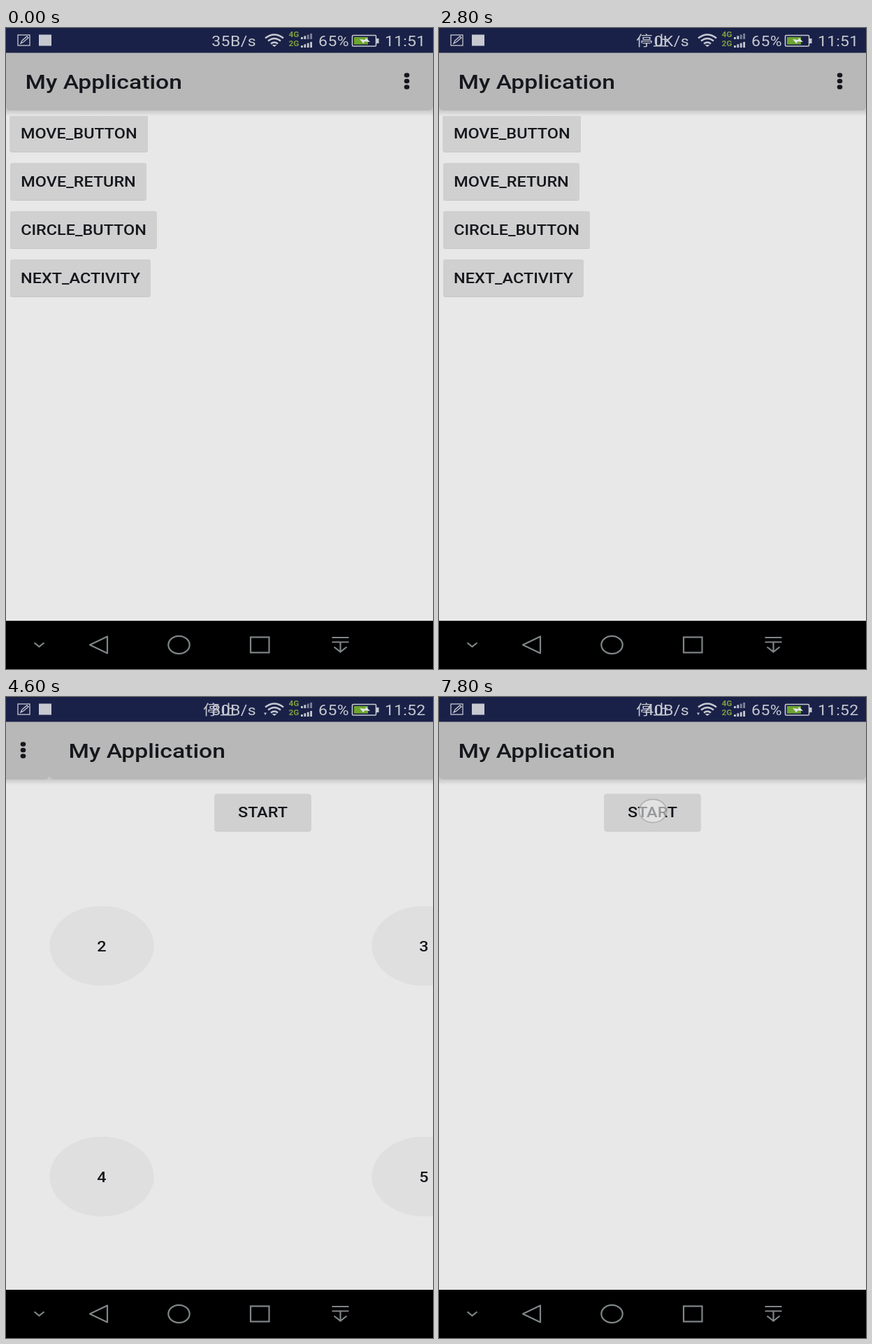
An HTML page for the animation above (8 s loop, 611 by 917 pixels).

```html
<!DOCTYPE html>
<html lang="en">
<head>
<meta charset="utf-8">
<title>My Application</title>
<style>
  html, body { margin: 0; width: 100%; height: 100%; overflow: hidden; background: #e8e8e8; }
  svg { display: block; width: 611px; height: 917px; font-family: Roboto, "Noto Sans", sans-serif; }
  .label { font-size: 19.8px; font-weight: 500; fill: #15171c; text-anchor: middle; }
  .title { font-size: 28.4px; font-weight: 500; fill: #15171c; }
  .status { font-size: 19.4px; fill: #c6c9d0; }
  .cjk { font-family: "Noto Sans CJK SC", "Noto Sans CJK", sans-serif; font-size: 20px; }
  .net { font-size: 10px; font-weight: 700; fill: #7f9c3c; }
  .line { fill: none; stroke: #c6c9d0; }
  .nav { fill: none; stroke: #7f8688; stroke-width: 2.2; }
</style>
</head>
<body>
<svg id="stage" viewBox="0 0 611 917"></svg>
<script>
const LOOP = 8000, STEP = 200, WIDTH = 611;
const ASPECT = 1.1845; // the phone screen is shown wider than it is
const CENTER = { x: 306, y: 524.5 };

const buttons = [
  { text: 'MOVE_BUTTON', x: 5.5, y: 124, w: 197.5 },
  { text: 'MOVE_RETURN', x: 6, y: 193, w: 195 },
  { text: 'CIRCLE_BUTTON', x: 6, y: 262, w: 210 },
  { text: 'NEXT_ACTIVITY', x: 6, y: 331, w: 201 },
  { text: 'START', x: 236.5, y: 138.5, w: 138 }
];
const balls = [
  { text: 2, x: 75, y: 356 },
  { text: 3, x: 536, y: 356 },
  { text: 4, x: 75, y: 686 },
  { text: 5, x: 536, y: 686 }
];
const taps = [
  { from: 200, to: 600, x: 104, y: 150, button: 0 },
  { from: 1600, to: 2000, x: 120.5, y: 213, button: 1 },
  { from: 3000, to: 3200, x: 110, y: 288, button: 2 },
  { from: 4200, to: 4400, x: 106, y: 355, button: 3 },
  { from: 5200, to: 5600, x: 306, y: 163 },
  { from: 7600, to: 8000, x: 306, y: 163 }
];

const place = (x, y, extra = '') => `translate(${x} ${y}) scale(${ASPECT} 1) ${extra}`;
const text = (x, y, cls, str, attrs = '') =>
  `<text class="${cls}" transform="${place(x, y)}" ${attrs}>${str}</text>`;

function buttonMarkup(b, i) {
  const w = b.w / ASPECT, h = 53;
  b.cx = b.x + b.w / 2;
  b.cy = b.y + h / 2;
  const box = `x="${-w / 2}" y="${-h / 2}" width="${w}" height="${h}" rx="3"`;
  return `<g id="button${i}" transform="${place(b.cx, b.cy)}">
    <clipPath id="clip${i}"><rect ${box}/></clipPath>
    <rect ${box} fill="#c6c6c6" transform="translate(0 1)"/>
    <rect id="face${i}" ${box} fill="#d0d0d0"/>
    <g clip-path="url(#clip${i})"><circle id="ripple${i}" cx="3" r="0" fill="#b5b5b5"/></g>
    <text class="label" y="7">${b.text}</text></g>`;
}

const ballMarkup = (b, i) => `<g id="ball${i}">
  <ellipse id="disc${i}" rx="63" ry="57" fill="#dfdfdf"/>
  <text class="label" y="8">${b.text}</text></g>`;

const barMarkup = dots => `
  <rect y="110" width="611" height="16" fill="url(#shade)"/>
  <rect y="20" width="611" height="98" rx="6" fill="#b8b8b8"/>
  ${text(27.5, 86.5, 'title', 'My Application')}
  ${dots ? [67.5, 76, 84.5].map(y => `<ellipse cx="573.5" cy="${y}" rx="3.8" ry="3.3" fill="#15171c"/>`).join('') : ''}`;

function signalMarkup(y) {
  return [0, 1, 2, 3].map(i => {
    const h = 3 + i * 1.7;
    const fill = y < 20 && i > 1 ? '#7c8299' : '#c6c9d0';
    return `<rect x="${422 + i * 4.4}" y="${y - h}" width="2.8" height="${h}" fill="${fill}"/>`;
  }).join('');
}

const statusMarkup = `
  <rect width="611" height="35.5" fill="#1a2148"/>
  <g class="line" stroke-width="1.3">
    <rect x="17" y="10" width="17" height="15"/>
    <path d="M21 22l2-4 7-6 2 2-7 6z"/>
  </g>
  <rect x="47" y="9.5" width="18" height="16" fill="#c6c9d0"/>
  <g id="stop">${text(282, 26, 'status cjk', '停止')}</g>
  ${text(358, 25.5, 'status', '', 'id="speed" text-anchor="end" letter-spacing=".4"')}
  <path class="line" stroke-width="2.4" d="M371 14.500q13-10 26 0M375 18.500q9-7 18 0M379 22.500q5-4 10 0"/>
  <path d="M380.500 24h7l-3.500 3z" fill="#c6c9d0"/>
  <path id="traffic" d="M369 22.500h4l-2 3.500z" fill="#c6c9d0"/>
  ${text(404.5, 12.5, 'net', '4G')}${text(404.5, 25.5, 'net', '2G')}
  ${signalMarkup(16)}${signalMarkup(28)}
  ${text(447, 25.5, 'status', '65%', 'letter-spacing=".4"')}
  <rect class="line" stroke-width="1.6" x="495.500" y="10.500" width="34" height="15.500" rx="1.500"/>
  <rect x="530" y="15" width="3.500" height="7" fill="#c6c9d0"/>
  <rect x="498" y="13" width="20" height="10.500" fill="#6da52f"/>
  <path d="M506 16l8 1 1-3 6 6-8-.8-1.500 3z" fill="#e4e6e8"/>
  ${text(542, 25.5, 'status', '', 'id="clock" letter-spacing=".2"')}`;

const navMarkup = `
  <rect y="848" width="611" height="69" fill="#000"/>
  <g class="nav">
    <path d="M40.500 879.500l7 5.500 7-5.500"/>
    <path d="M120 882.500L145 870.500V894.500z" stroke-linejoin="round"/>
    <ellipse cx="247.500" cy="882.500" rx="15.200" ry="12.600"/>
    <rect x="350" y="871.500" width="26.500" height="22"/>
    <path d="M466.500 872h24M466.500 878.500h24M478.500 878.500v14M469.500 885.500l9 7 9-7"/>
  </g>`;

const stage = document.getElementById('stage');
stage.innerHTML = `
  <defs><linearGradient id="shade" x2="0" y2="1">
    <stop offset=".5" stop-color="#cacaca"/><stop offset="1" stop-color="#e8e8e8"/>
  </linearGradient></defs>
  <rect width="611" height="917" fill="#e8e8e8"/>
  <g id="first">${buttons.slice(0, 4).map(buttonMarkup).join('')}${barMarkup(true)}</g>
  <g id="second"><rect y="36" width="611" height="812" fill="#e8e8e8"/>
    ${balls.map(ballMarkup).join('')}${buttonMarkup(buttons[4], 4)}${barMarkup(false)}</g>
  ${statusMarkup}${navMarkup}
  <g id="touch"><circle r="16.600" fill="#eee" fill-opacity=".6" stroke="#a8a8a8" stroke-opacity=".8" stroke-width="1.6"/></g>`;

const parts = {};
stage.querySelectorAll('[id]').forEach(el => parts[el.id] = el);
const set = (id, name, value) => parts[id].setAttribute(name, value);
const show = (id, on) => set(id, 'visibility', on ? 'visible' : 'hidden');

const progress = (t, start, length) => Math.min(1, Math.max(0, (t - start) / length));
const ease = p => (1 - Math.cos(Math.PI * p)) / 2;

function drawStatus(t) {
  const speed = t < 200 ? '35B/s' : t < 4400 ? '0K/s' : t < 7000 ? '80B/s' : '40B/s';
  parts.speed.textContent = speed;
  parts.clock.textContent = t < 4400 ? '11:51' : '11:52';
  show('stop', t >= 200);
  show('traffic', t >= 3800);
}

function drawMove(t) {
  const p = ease(progress(t, 500, 1000)) - ease(progress(t, 1900, 800));
  const b = buttons[0];
  set('button0', 'transform', place(b.cx + 225.5 * p, b.cy + 11.5 * p, `rotate(${357 * p}) scale(${1 + .98 * p} 1)`));
  set('button0', 'opacity', 1 - .74 * p);
}

function drawCircle(t) {
  const p = ease(progress(t, 3100, 855));
  const start = Math.atan2(-60, -80);
  const a = start + 2 * Math.PI * p, r = 47.8;
  const dx = r * (Math.cos(a) - Math.cos(start)) * ASPECT;
  const dy = r * (Math.sin(a) - Math.sin(start));
  set('button2', 'transform', place(buttons[2].cx + dx, buttons[2].cy + dy));
}

// Each ball follows a half circle from its corner to the middle.
function drawBalls(t) {
  const p = ease(progress(t, 5747, 850));
  const turn = p * Math.PI / 2;
  balls.forEach((b, i) => {
    const x = (b.x - CENTER.x) / ASPECT, y = b.y - CENTER.y;
    const a = Math.atan2(y, x) + turn;
    const r = Math.hypot(x, y) * Math.cos(turn);
    set('ball' + i, 'transform',
      place(CENTER.x + r * Math.cos(a) * ASPECT, CENTER.y + r * Math.sin(a), `scale(${1 - .82 * p})`));
    set('ball' + i, 'opacity', 1 - p);
    set('disc' + i, 'opacity', Math.max(0, 1 - 2 * p));
    show('ball' + i, p < 1);
  });
}

function drawTouch(t) {
  const tap = taps.find(k => t >= k.from && t < k.to);
  show('touch', tap);
  if (tap) set('touch', 'transform', place(tap.x, tap.y));
  for (let i = 0; i < 4; i++) {
    const pressed = tap && tap.button === i;
    set('ripple' + i, 'r', pressed ? 45 + (t - tap.from) * .15 : 0);
    set('face' + i, 'fill', pressed ? '#c6c6c6' : '#d0d0d0');
  }
}

function drawPages(t) {
  const left = Math.round(WIDTH * (1 - progress(t, 4300, 440)) ** 2);
  set('first', 'transform', `translate(${left - WIDTH} 0)`);
  set('second', 'transform', `translate(${left} 0)`);
}

function draw(t) {
  [drawStatus, drawMove, drawCircle, drawBalls, drawTouch, drawPages].forEach(f => f(t));
}

const begin = performance.now();
let last = -1;
function tick() {
  const t = Math.floor((performance.now() - begin) % LOOP / STEP) * STEP;
  if (t !== last) draw(last = t);
  requestAnimationFrame(tick);
}
tick();
</script>
</body>
</html>
```
